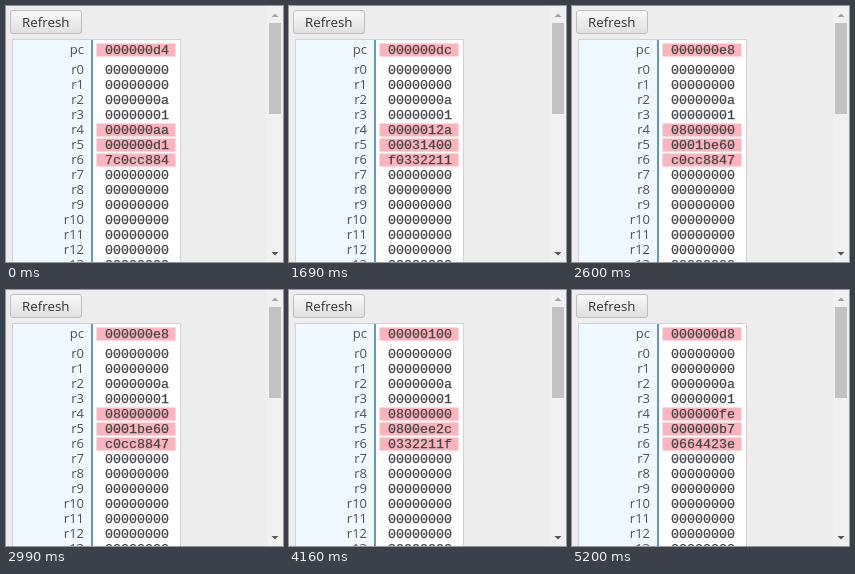
These frames come from a looping animation (277 px wide and 256 px high, 5.33 s). An HTML page with a canvas:

```html
<!DOCTYPE html>
<html lang="en">
<head>
<meta charset="utf-8">
<title>Register view</title>
<style>
  html, body { margin: 0; width: 100%; height: 100%; overflow: hidden; background: #ededed; }
  canvas { display: block; }
</style>
</head>
<body>
<canvas id="stage" width="277" height="256"></canvas>
<script>
const ctx = document.getElementById('stage').getContext('2d');
const LOOP = 5330;
const BUTTON_FONT = '13.33px "Open Sans", "Noto Sans", sans-serif';
const LABEL_FONT = '13px "Open Sans", "Noto Sans", sans-serif';
const MONO_FONT = '13.33px "Liberation Mono", monospace';

// r6 rotates left by one bit with each sample after the first.
const samples = [
  { at: 0,    pc: 0xd4,  r4: 0xaa,      r5: 0xd1,      r6: 0x7c0cc884 },
  { at: 1170, pc: 0xdc,  r4: 0x12a,     r5: 0x31400 },
  { at: 1820, pc: 0x84,  r4: 0xcd,      r5: 0xa4,      quietPc: true },
  { at: 2600, pc: 0xe8,  r4: 0x8000000, r5: 0x1be60 },
  { at: 3380, pc: 0xd4,  r4: 0x107,     r5: 0x77 },
  { at: 4160, pc: 0x100, r4: 0x8000000, r5: 0x800ee2c },
  { at: 4940, pc: 0xd8,  r4: 0xfe,      r5: 0xb7 }
];
const rotateLeft = (value, bits) => ((value << bits) | (value >>> (32 - bits))) >>> 0;
samples.forEach((sample, i) => {
  if (i) sample.r6 = rotateLeft(samples[0].r6, i + 1);
});

const hex = value => value.toString(16).padStart(8, '0');

function rect(x, y, w, h, color) {
  ctx.fillStyle = color;
  ctx.fillRect(x, y, w, h);
}

function text(string, x, y, font, color, align = 'left') {
  ctx.font = font;
  ctx.fillStyle = color;
  ctx.textAlign = align;
  ctx.fillText(string, x, y);
}

function drawButton() {
  const shade = ctx.createLinearGradient(0, 5, 0, 28);
  shade.addColorStop(0, '#f8f8f8');
  shade.addColorStop(1, '#dfdfdf');
  ctx.beginPath();
  ctx.roundRect(4.5, 4.5, 71, 23, 2.5);
  ctx.fillStyle = shade;
  ctx.fill();
  ctx.strokeStyle = '#bebebe';
  ctx.lineWidth = 1;
  ctx.stroke();
  text('Refresh', 16, 21, BUTTON_FONT, '#303030');
}

function arrow(y, direction, color) {
  ctx.beginPath();
  ctx.moveTo(265.5, y);
  ctx.lineTo(272.5, y);
  ctx.lineTo(269, y + 3.5 * direction);
  ctx.fillStyle = color;
  ctx.fill();
}

function drawScrollbar() {
  rect(261, 0, 16, 256, '#f0f0f0');
  rect(263, 17, 12, 91, '#c3c2c3');
  arrow(11, -1, '#a3a3a3');
  arrow(246, 1, '#555');
}

function drawRow(name, value, baseline, changed) {
  if (changed) rect(90.5, baseline - 10.5, 79, 13, '#fbb4be');
  text(name, 78, baseline, LABEL_FONT, '#505050', 'right');
  text(hex(value), 99, baseline, MONO_FONT, '#444');
  ctx.strokeStyle = '#444';
  ctx.lineWidth = 0.25;
  ctx.strokeText(hex(value), 99, baseline);
}

function drawRegisters(sample) {
  rect(6, 33, 169, 223, '#d2d2d2');
  rect(7, 34, 167, 222, '#fff');
  rect(7, 34, 78, 222, '#f0f8ff');
  rect(85, 34, 2, 222, '#6595c5');
  drawRow('pc', sample.pc, 48, !sample.quietPc);

  const fixed = { r2: 10, r3: 1 };
  for (let i = 0; i < 14; i++) {
    const name = 'r' + i;
    const live = name in sample;
    drawRow(name, live ? sample[name] : fixed[name] || 0, 68 + 15 * i, live);
  }
}

function draw(time) {
  const t = time % LOOP;
  rect(0, 0, 277, 256, '#ededed');
  drawButton();
  drawRegisters(samples.findLast(sample => sample.at <= t));
  drawScrollbar();
}

const start = performance.now();
function tick(now) {
  draw(Math.max(0, now - start));
  requestAnimationFrame(tick);
}
draw(0);
requestAnimationFrame(tick);
</script>
</body>
</html>
```
